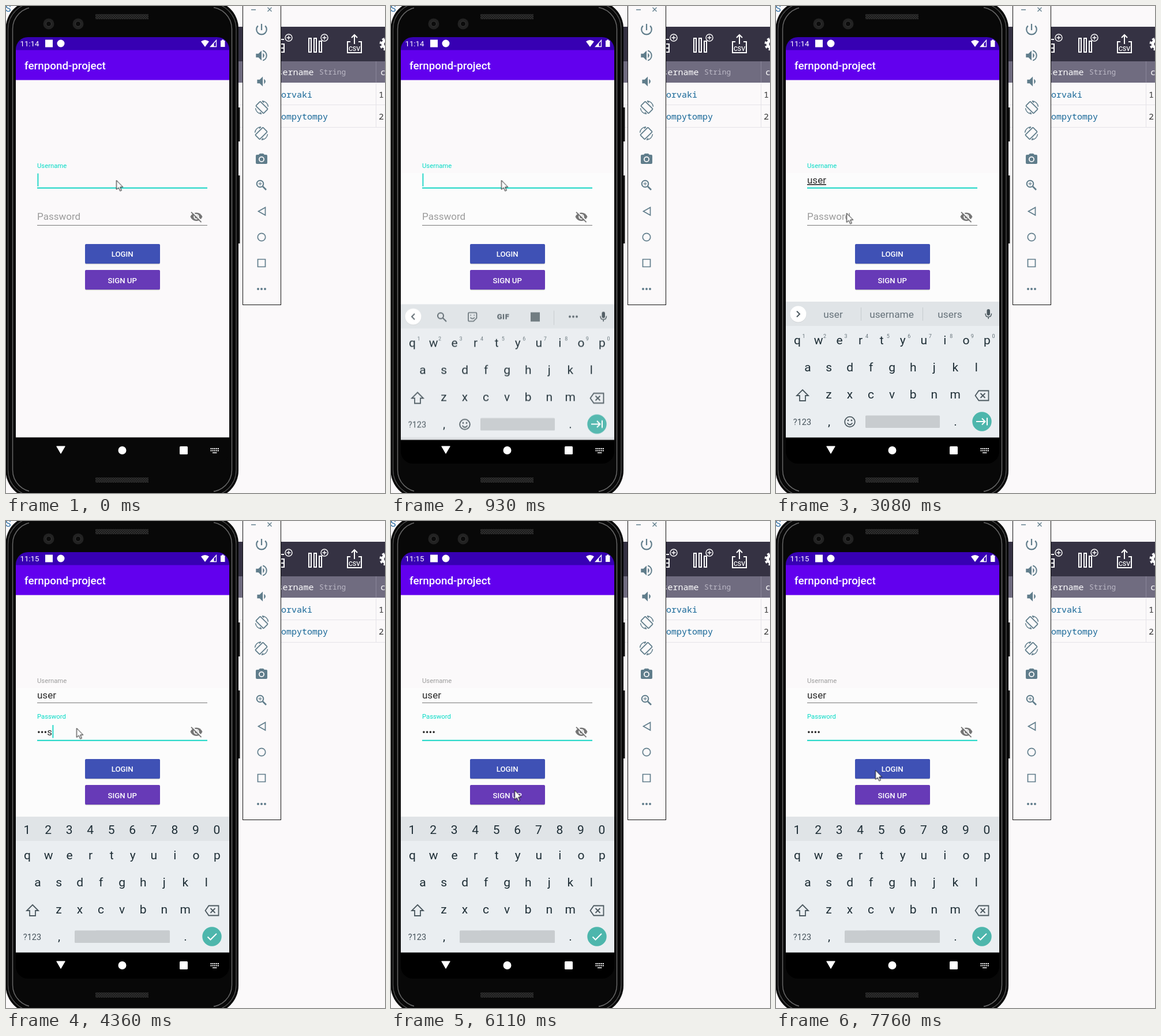
Animation of 657x845 px, one loop 8 s. Source, as an HTML page:

```html
<!DOCTYPE html>
<html lang="en">
<head>
<meta charset="utf-8">
<title>Login form</title>
<style>
html, body { margin: 0; width: 100%; height: 100%; overflow: hidden; background: #fbf9fa; }
svg { display: block; }
text { font-family: Roboto, sans-serif; white-space: pre; }
.mono { font-family: "Noto Sans Mono", monospace; font-size: 15px; }
.mid { text-anchor: middle; }
.key { font-size: 21px; fill: #1d2d35; text-anchor: middle; }
.tiny { font-size: 9px; fill: #66737a; text-anchor: middle; }
.word { font-size: 17.3px; fill: #66727a; text-anchor: middle; }
.field { font-size: 17px; fill: #2a2a2a; }
.small { font-size: 11.3px; }
.btn { font-size: 13.2px; font-weight: 500; fill: #fff; text-anchor: middle; }
.line { fill: none; stroke-width: 2; }

/* 1% = 80 ms */
.cut, .fade { animation: 8s step-end infinite; }
.fade { animation-timing-function: linear; }
#sheet { animation-name: sheet; }
#keyboard { animation-name: keyboard; }
#userRows { animation-name: userRows; }
#userCaret { animation-name: userCaret; }
#passRows { animation-name: passRows; }
#passCaret { animation-name: passCaret; }
#tools { animation-name: tools; }
#words { animation-name: words; }
#textKeys { animation-name: textKeys; }
#passKeys { animation-name: passKeys; }
#before { animation-name: before; }
#after { animation-name: after; }
#press { animation-name: press; }
#userLabel { animation-name: userLabel; fill: #03dac5; }
#hint { animation-name: hint; fill: #9b9b9b; font-size: 17px; }
#userFocus { animation-name: blur; }
#passFocus { animation-name: focus; }
#mouse { animation: mouse 8s linear infinite; }

@keyframes sheet { 0% { opacity: 0 } 10.75%, 100% { opacity: 1 } }
@keyframes keyboard {
  0% { opacity: 0; transform: translateY(47px) }
  10.75% { opacity: .35; transform: translateY(30px) }
  11.125% { opacity: .75; transform: translateY(13px) }
  11.625% { opacity: .95; transform: translateY(4.5px) }
  12.125% { opacity: .99; transform: translateY(1.5px) }
  12.75%, 100% { opacity: 1; transform: none }
}
@keyframes userRows {
  0% { transform: none }
  16% { transform: translateY(-40px) }
  17.375% { transform: translateY(-80px) }
  18.75% { transform: translateY(-120px) }
  20.125% { transform: translateY(-160px) }
  39.625%, 100% { transform: translateY(-200px) }
}
@keyframes userCaret {
  0% { opacity: 1; transform: none }
  5.5% { opacity: 0; transform: none }
  11.625% { opacity: 1; transform: none }
  16% { opacity: 1; transform: translateX(9px) }
  17.375% { opacity: 1; transform: translateX(18px) }
  18.75% { opacity: 1; transform: translateX(27px) }
  20.125% { opacity: 1; transform: translateX(33px) }
  26.375% { opacity: 0; transform: translateX(33px) }
  32.5% { opacity: 1; transform: translateX(33px) }
  38.5%, 100% { opacity: 0 }
}
@keyframes passRows {
  0% { transform: none }
  50% { transform: translateY(-40px) }
  50.5% { transform: translateY(-80px) }
  53% { transform: translateY(-120px) }
  54.5% { transform: translateY(-160px) }
  73.25%, 100% { transform: translateY(-200px) }
}
@keyframes passCaret {
  0% { opacity: 0; transform: none }
  39.625% { opacity: 1; transform: none }
  46.25% { opacity: 0; transform: none }
  50% { opacity: 1; transform: translateX(9px) }
  50.5% { opacity: 1; transform: translateX(15px) }
  53% { opacity: 1; transform: translateX(20px) }
  54.5% { opacity: 1; transform: translateX(26px) }
  60.75% { opacity: 0; transform: translateX(26px) }
  65.75% { opacity: 1; transform: translateX(26px) }
  72% { opacity: 0; transform: translateX(23px) }
  78.125% { opacity: 1; transform: translateX(23px) }
  84.375% { opacity: 0; transform: translateX(23px) }
  90.625% { opacity: 1; transform: translateX(23px) }
  97%, 100% { opacity: 0 }
}
@keyframes tools { 0%, 32.9% { opacity: 1 } 33%, 42.875% { opacity: 0 } 44.375%, 100% { opacity: 1 } }
@keyframes words { 0%, 32.9% { opacity: 0 } 33%, 42.875% { opacity: 1 } 44.375%, 100% { opacity: 0 } }
@keyframes textKeys { 0% { opacity: 1 } 46.25% { opacity: .5 } 46.75%, 100% { opacity: 0 } }
@keyframes passKeys { 0% { opacity: 0 } 46.25% { opacity: .5 } 46.75%, 100% { opacity: 1 } }
@keyframes before { 0% { opacity: 1 } 43.625%, 100% { opacity: 0 } }
@keyframes after { 0% { opacity: 0 } 43.625%, 100% { opacity: 1 } }
@keyframes press { 0% { opacity: 0 } 90.125% { opacity: .06 } 90.75% { opacity: .12 } 91.375% { opacity: .06 } 92%, 100% { opacity: 0 } }
@keyframes userLabel { 0%, 39.625% { fill: #03dac5 } 42%, 100% { fill: #9b9b9b } }
@keyframes blur { 0%, 39.625% { opacity: 1 } 42%, 100% { opacity: 0 } }
@keyframes focus { 0%, 39.625% { opacity: 0 } 42%, 100% { opacity: 1 } }
@keyframes hint {
  0%, 39.625% { fill: #9b9b9b; transform: none; animation-timing-function: ease-in-out }
  42.25%, 100% { fill: #03dac5; transform: translateY(-28px) scale(.665) }
}
@keyframes mouse {
  0%, 33% { transform: translate(191.5px, 302.5px); animation-timing-function: ease-in-out }
  38.4%, 66.5% { transform: translate(122.5px, 359.5px); animation-timing-function: ease-in-out }
  72% { transform: translate(246px, 425px) }
  75.625% { transform: translate(223px, 455px) }
  76.3%, 76.8% { transform: translate(214.5px, 467.5px) }
  77.5% { transform: translate(213px, 470px); animation-timing-function: ease-in-out }
  81.25%, 100% { transform: translate(172.5px, 432.5px) }
}
</style>
</head>
<body>
<svg width="657" height="845" viewBox="0 0 657 845">
  <defs>
    <pattern id="mesh" width="4" height="4" patternUnits="userSpaceOnUse">
      <rect width="4" height="4" fill="#1b1b1b"/><path d="M0 0L4 4M4 0L0 4" stroke="#343434" stroke-width=".8"/>
    </pattern>
    <clipPath id="screen"><rect x="17" y="54" width="370" height="740" rx="21"/></clipPath>
    <g id="plus" fill="none" stroke="#fff" stroke-width="1.4"><circle r="6" fill="#353243"/><path d="M-3.5 0H3.5M0-3.5V3.5"/></g>
    <g id="turn" fill="none" stroke="#607d8b" stroke-width="1.8">
      <rect x="-5.4" y="-9.4" width="10.8" height="18.8" rx="1.2" transform="rotate(-45)"/>
      <path d="M.5-11.2A11 11 0 0 1 11-1.2M.5-11.2L3.500-8.400M-.5 11.200A11 11 0 0 1-11 1.200M-.5 11.200L-3.500 8.400" stroke-width="1.500"/>
    </g>
    <g id="shadowed"><rect x="137" y="1.2" width="130" height="34" rx="2" fill="#000" opacity=".2"/><rect x="137" width="130" height="34" rx="2"/></g>
  </defs>
  <rect width="657" height="845" fill="#fbf9fa"/>

  <!-- data browser -->
  <text x="-1" y="10" font-size="16" fill="#2a6da5">S</text>
  <path fill="#353243" d="M380 36H657V96H380z"/>
  <path fill="#706c80" d="M380 96H657V133H380z"/>
  <path d="M380 171.5H657M380 210.5H657M641.5 133V210" stroke="#e5e3e8"/>
  <path d="M641.5 96V133" stroke="#8a8699"/>
  <g class="line" stroke="#fff">
    <path d="M470 58H482M470 66H482V73H470M470 80H482V73"/>
    <path d="M525 56H529V80H525zM534 56H538V80H534zM543 61V80H547V61z"/>
    <path d="M597 62H592V81H616V62H611M604 66V51M599 55L604 50 609 55"/>
    <circle cx="659" cy="66" r="6" stroke-width="5"/>
    <circle cx="659" cy="66" r="9.5" stroke-width="4" stroke-dasharray="4 3.5"/>
  </g>
  <use href="#plus" x="490" y="55"/><use href="#plus" x="552" y="55"/>
  <text class="mid" x="604" y="78" font-size="10.5" font-weight="500" fill="#fff">CSV</text>
  <text class="mono" x="470.5" y="120" fill="#fff" font-weight="500">sername</text>
  <text class="mono" x="543" y="119" fill="#bcb9c6" style="font-size:12.8px">String</text>
  <text class="mono" x="649" y="120" fill="#fff">c</text>
  <g fill="#146596"><text class="mono" x="477" y="159">orvaki</text><text class="mono" x="477" y="197">ompytompy</text></g>
  <g fill="#333"><text class="mono" x="646" y="159">1</text><text class="mono" x="646" y="197">2</text></g>

  <!-- emulator panel -->
  <rect x="410.5" y="-5" width="66" height="523.5" fill="#fbf9fa" stroke="#111"/>
  <g class="line" stroke="#607d8b">
    <path d="M425 6.5H433M453.5 2.5L460.5 9.5M460.5 2.5L453.5 9.5" stroke-width="1.4"/>
    <path d="M443 31V42M436.8 34.4A8.8 8.8 0 1 0 449.2 34.4" stroke-width="2.2"/>
    <path d="M445.200 77.500A8.800 8.800 0 0 1 445.200 94.500"/>
    <path d="M449.500 349.500V363L437.500 356.300z" stroke-width="1.700"/>
    <circle cx="443" cy="401" r="6.700" stroke-width="1.700"/>
    <path d="M436.500 439.500H449.500V452.500H436.500z" stroke-width="1.700"/>
    <circle cx="440.500" cy="308.500" r="5.800"/><path d="M445 313L451 319" stroke-width="2.600"/><path d="M437.500 308.500H443.500M440.500 305.500V311.500" stroke-width="1.200"/>
  </g>
  <g fill="#607d8b">
    <path d="M433.300 82.800H437.600L443 77.400V94.600L437.600 89.200H433.300zM445.200 81.600Q450.500 86 445.200 90.400z"/>
    <path d="M435.400 127.800H439.700L445.100 122.400V139.600L439.700 134.200H435.400zM447.300 126.600Q452.600 131 447.300 135.400z"/>
    <path d="M435 258H438L440 256H446L448 258H451Q453 258 453 260V272Q453 274 451 274H435Q433 274 433 272V260Q433 258 435 258z"/>
    <circle cx="443" cy="266" r="5" fill="#fbf9fa"/><circle cx="443" cy="266" r="3.200"/>
    <circle cx="437" cy="491" r="2"/><circle cx="443" cy="491" r="2"/><circle cx="449" cy="491" r="2"/>
  </g>
  <use href="#turn" x="443.500" y="176"/>
  <use href="#turn" transform="translate(442.500 221) scale(-1 1)"/>

  <!-- phone -->
  <path d="M400 176H405.500V235H400zM400 294H405.500V412H400z" fill="#111"/>
  <rect x="-.5" y="-9" width="403.500" height="863" rx="48" fill="#080808"/>
  <g class="line">
    <rect x="3.500" y="-5" width="395.500" height="855" rx="45" stroke="#555" style="stroke-width:1.200"/>
    <rect x="11.500" y="2" width="380" height="841" rx="38" stroke="#666" style="stroke-width:1.500"/>
  </g>
  <path d="M40 0H360V6H40zM40 838H360V845H40z" fill="#080808"/>
  <path d="M155 14H247V23H155zM155 818H247V827H155z" fill="url(#mesh)"/>
  <g fill="#222"><circle cx="74" cy="31" r="9.500"/><circle cx="125" cy="31" r="9.500"/></g>
  <g fill="#0b0b0b" stroke="#383838"><circle cx="74" cy="31" r="4.500"/><circle cx="125" cy="31" r="4.500"/></g>

  <g clip-path="url(#screen)">
    <path fill="#080808" d="M17 54H387V794H17z"/>
    <path fill="#fbf9fa" d="M17 128H387V748.500H17z"/>
    <g id="sheet" class="cut"><path fill="#fcfcfc" d="M17 290H387V748.500H17z"/><path d="M17 748.500H387V794H17z"/></g>
    <path fill="#3700b3" d="M17 54H387V77H17z"/>
    <path fill="#6200ee" d="M17 76.500H387V128.500H17z"/>
    <g fill="#fff">
      <g font-size="13.200"><text id="before" class="cut" x="24.500" y="70">11:14</text><text id="after" class="cut" x="24.500" y="70">11:15</text></g>
      <rect x="68" y="58.500" width="13" height="13"/><circle cx="95" cy="65" r="6.500"/>
      <path d="M338 61.500Q345 56.500 352 61.500L345 71z"/>
      <path d="M364.500 59.500V70.500H354.500z" fill="none" stroke="#fff" stroke-width="1.300"/><path d="M360.500 64V71H354z"/>
      <path d="M372 60H374V58.500H377.500V60H379.500V71H372z"/>
      <text x="32" y="110" font-size="18.840" font-weight="500">fernpond-project</text>
    </g>

    <!-- form -->
    <text id="userLabel" class="small fade" x="54" y="281">Username</text>
    <path d="M54 315.500H349M54 380.500H349" stroke="#777"/>
    <path id="userFocus" class="fade" d="M54 315.700H349" stroke="#15d5c4" stroke-width="2"/>
    <path id="passFocus" class="fade" d="M54 380.700H349" stroke="#15d5c4" stroke-width="2"/>
    <g transform="translate(54 371)"><text id="hint" class="fade">Password</text></g>
    <svg x="50" y="290" width="250" height="24"><g id="userRows" class="cut field"></g></svg>
    <svg x="50" y="353" width="250" height="24"><g id="passRows" class="cut field"></g></svg>
    <rect id="userCaret" class="cut" x="54.500" y="290.500" width="1.800" height="22.500" fill="#15d5c4"/>
    <rect id="passCaret" class="cut" x="54.500" y="354" width="1.800" height="22.500" fill="#15d5c4"/>
    <g fill="#757575">
      <path d="M319.500 365.700Q323 358.500 330 358.500T340.500 365.700Q337 372.900 330 372.900T319.500 365.700z"/>
      <circle cx="330" cy="365.700" r="3.800" stroke="#fcfcfc" stroke-width="2"/>
      <path d="M322.500 356.500L340.500 374.500" stroke="#fcfcfc" stroke-width="2"/><path d="M321 357.700L338.500 375.200" stroke="#757575" stroke-width="1.800"/>
    </g>
    <use href="#shadowed" y="413" fill="#3f51b5"/>
    <rect id="press" class="cut" x="137" y="413" width="130" height="34" rx="2" fill="#fff"/>
    <use href="#shadowed" y="458" fill="#673ab7"/>
    <text class="btn" x="201.700" y="435.300">LOGIN</text>
    <text class="btn" x="201.700" y="480.500">SIGN UP</text>

    <!-- keyboard -->
    <g id="keyboard" class="cut">
      <path fill="#eaeef1" d="M17 513H387V748.500H17z"/>
      <path fill="#e0e4e7" d="M17 513H387V555H17z"/>
      <g id="letters"></g>
      <text class="mid" x="45.500" y="726.500" font-size="14.500" fill="#45525a">?123</text>
      <g class="line" stroke="#4b585f">
        <path d="M46 666L56 676H51V685H41V676H36z" stroke-width="1.800"/>
        <path d="M351.500 667.500H368.500V684.500H351.500L345.500 676zM354.500 672L362.500 680M362.500 672L354.500 680" stroke-width="1.800"/>
      </g>
      <rect x="155" y="710.500" width="129" height="21.500" rx="1.500" fill="#c8cccf"/>
      <circle cx="357" cy="721" r="16.700" fill="#4db6ac"/>

      <g id="textKeys" class="cut">
        <g id="supers"></g>
        <g class="line" stroke="#4b585f"><circle cx="128" cy="721.500" r="8.800" stroke-width="1.800"/><path d="M123.500 723.500Q128 729.500 132.500 723.500" stroke-width="1.800"/></g>
        <circle cx="125" cy="719" r="1.400" fill="#4b585f"/><circle cx="131" cy="719" r="1.400" fill="#4b585f"/>
        <path class="line" d="M347 721H362M357 715.500L362.500 721 357 726.500M366 714.500V727.500" stroke="#fff"/>
        <circle cx="38.500" cy="535.300" r="14" fill="#000" opacity=".1"/><circle cx="38.500" cy="534.500" r="14" fill="#fff"/>
        <rect x="365.500" y="526" width="5.500" height="11" rx="2.700" fill="#4b585f"/>
        <path class="line" d="M363 533.500Q363 539.500 368.200 539.500T373.500 533.500M368.200 539.500V543" stroke="#4b585f" style="stroke-width:1.500"/>
        <g id="tools" class="fade">
          <g class="line" stroke="#5a666d">
            <path d="M41 529.500L36 534.500 41 539.500"/>
            <circle cx="86" cy="533" r="5"/><path d="M89.500 536.500L96 543"/>
            <path d="M134 529Q134 527.500 135.500 527.500H147Q148.500 527.500 148.500 529V537L143 542.500H135.500Q134 542.500 134 541z" stroke-width="1.600"/>
            <path d="M137.500 536Q141 540 145 536M137.500 532H139M143.500 532H145" stroke-width="1.600"/>
          </g>
          <text class="mid" x="194.500" y="539" font-size="13" font-weight="900" fill="#5a666d" letter-spacing=".6">GIF</text>
          <rect x="242" y="527" width="16" height="16" fill="#6b767c"/>
          <path d="M282.500 524V549" stroke="#c6cbce"/>
          <g fill="#5a666d"><circle cx="310" cy="534.500" r="1.900"/><circle cx="316" cy="534.500" r="1.900"/><circle cx="322" cy="534.500" r="1.900"/></g>
        </g>
        <g id="words" class="fade">
          <path class="line" d="M36 529.500L41 534.500 36 539.500" stroke="#4b585f"/>
          <path d="M147.500 523V546M254.500 523V546" stroke="#c6cbce"/>
          <text class="word" x="99" y="541">user</text><text class="word" x="200.500" y="541">username</text><text class="word" x="301.500" y="541">users</text>
        </g>
      </g>

      <g id="passKeys" class="cut">
        <g id="digits"></g>
        <rect x="119" y="710.500" width="165" height="21.500" rx="1.500" fill="#c8cccf"/>
        <path class="line" d="M349.500 721.500L354.500 726.500 365 716" stroke="#fff"/>
      </g>
    </g>

    <!-- navigation -->
    <g fill="#fff">
      <path d="M88 763.500H102Q103 763.500 102.500 764.500L95.500 776.500Q95 777 94.500 776.500L87.500 764.500Q87 763.500 88 763.500z"/>
      <circle cx="201.500" cy="771" r="7"/><rect x="301" y="764" width="14" height="14" rx="1.500"/>
      <path d="M354.500 768H369M354.500 771.500H369" stroke="#fff" stroke-width="2" stroke-dasharray="2 1.100"/>
      <path d="M358 774.500H365.500V776H358z"/>
    </g>
  </g>
  <path id="mouse" d="M0 0V16L3.700 12.700 6.300 18.500 8.800 17.400 6.300 11.700H11.200z" fill="#fff" stroke="#111" stroke-width="1"/>
</svg>
<script>
const byId = id => document.getElementById(id);

function addText(parent, label, x, y, cls) {
  const node = document.createElementNS("http://www.w3.org/2000/svg", "text");
  node.setAttribute("x", x);
  node.setAttribute("y", y);
  if (cls) node.setAttribute("class", cls);
  node.textContent = label;
  byId(parent).append(node);
  return node;
}

function addRow(parent, chars, x, y, cls = "key") {
  [...chars].forEach((char, i) => addText(parent, char, x + 36.55 * i, y, cls));
}

addRow("letters", "qwertyuiop", 37, 586.5);
addRow("letters", "asdfghjkl", 55, 633.5);
addRow("letters", "zxcvbnm", 91.5, 681);
addText("letters", ",", 92, 728, "key");
addText("letters", ".", 311, 728, "key");
addRow("supers", "1234567890", 48, 575.5, "tiny");
addRow("digits", "1234567890", 36.5, 543);

// Each typing state is one row of a strip that moves behind its field.
["", "u", "us", "use", "user", "user"].forEach((word, i) => {
  const row = addText("userRows", word, 4, 18 + 40 * i);
  if (i < 5) row.style.textDecoration = "underline 1px";
});
["", "p", "•a", "••s", "•••s", "••••"].forEach((word, i) =>
  addText("passRows", word, 4, 18.5 + 40 * i));
</script>
</body>
</html>
```
